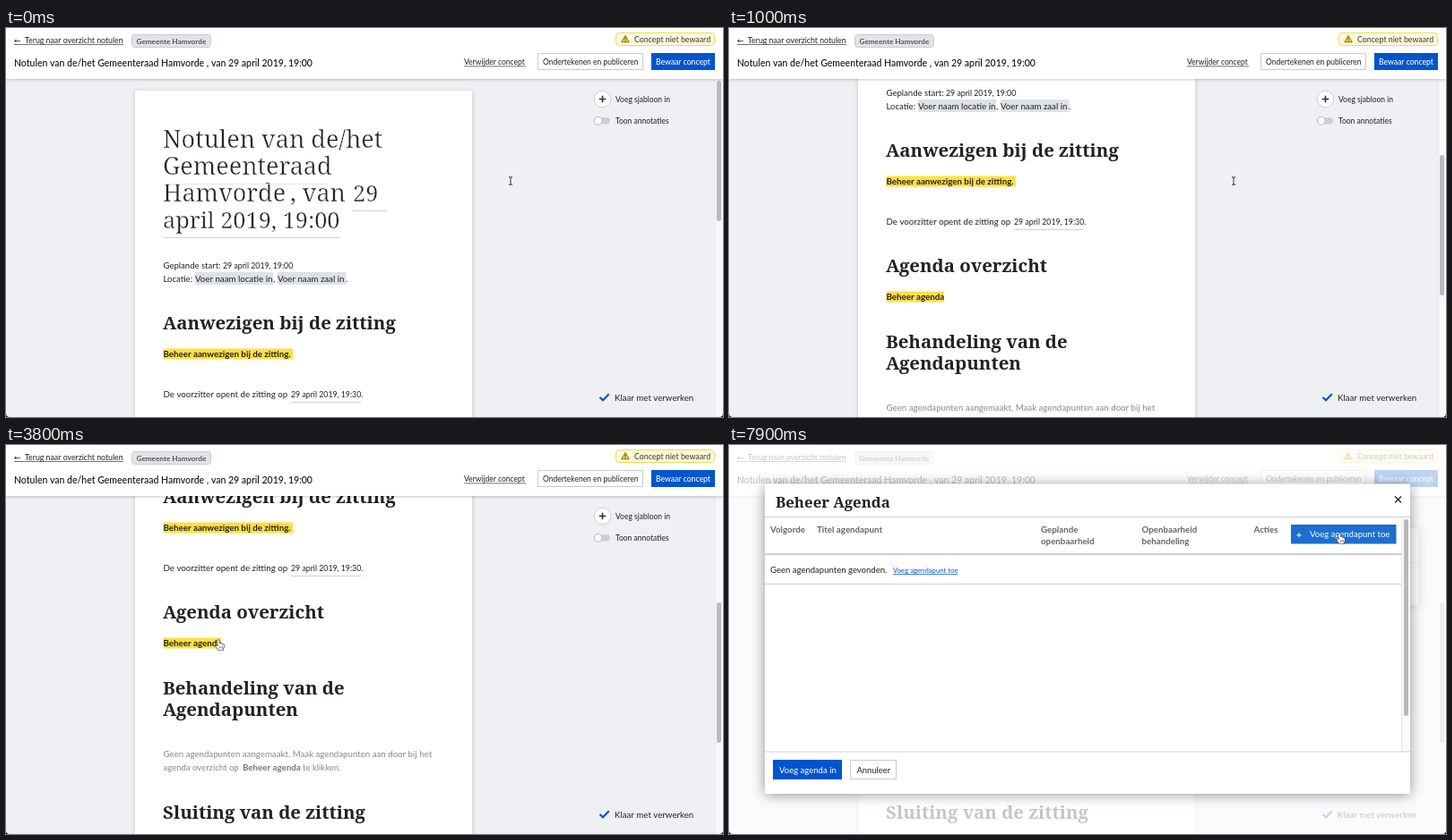
Write an HTML page with a canvas that moves like this. It is 800 by 435 pixels and loops after 8000 ms.

```html
<!DOCTYPE html>
<html lang="nl">
<head>
<meta charset="utf-8">
<title>Notulen</title>
<style>
html, body { margin: 0; width: 100%; height: 100%; overflow: hidden; background: #fff; }
canvas { display: block; width: 800px; height: 435px; }
</style>
</head>
<body>
<canvas id="stage"></canvas>
<script>
const W = 800, H = 435, LOOP = 8000;
const cv = document.getElementById('stage');
const c = cv.getContext('2d');
const dpr = window.devicePixelRatio || 1;
cv.width = W * dpr;
cv.height = H * dpr;

const SANS = 'Lato, "Open Sans", sans-serif';
const SERIF = '"Noto Serif", "DejaVu Serif", serif';
const BLUE = '#0055cc', INK = '#222', LINE = '#cbd0d8', YELLOW = '#ffe043';

// Text styles
const small = '400 8.5px ' + SANS;
const body = '400 9.7px ' + SANS;
const bold = '700 9.75px ' + SANS;
const date = '400 8.75px ' + SANS;
const label = '400 9.55px ' + SANS;
const note = '400 9.35px ' + SANS;
const column = '700 9.75px ' + SANS;
const h1 = '300 27px ' + SERIF;
const h1date = '300 25.3px ' + SERIF;
const h2 = '700 20.4px ' + SERIF;

// Event times in ms
const SCROLL_END = 1750, POPUP = 3900, MODAL = 6400, ROW_OFF = 7500, BTN_ON = 7600;

function text(s, x, y, font, color = INK) {
  c.font = font;
  c.fillStyle = color;
  c.fillText(s, x, y);
}

// A white outline trims the stems to a light weight
function thin(s, x, y, font) {
  text(s, x, y, font);
  c.strokeStyle = '#fff';
  c.lineWidth = .5;
  c.strokeText(s, x, y);
}

function box(x, y, w, h, fill, stroke, r = 0) {
  c.beginPath();
  c.roundRect(stroke ? x + .5 : x, stroke ? y + .5 : y, stroke ? w - 1 : w, stroke ? h - 1 : h, r);
  if (fill) { c.fillStyle = fill; c.fill(); }
  if (stroke) { c.strokeStyle = stroke; c.lineWidth = 1; c.stroke(); }
}

function shadowBox(x, y, w, h, blur, alpha, dy = 0) {
  c.save();
  c.shadowColor = `rgba(0,0,0,${alpha})`;
  c.shadowBlur = blur * dpr;
  c.shadowOffsetY = dy * dpr;
  box(x, y, w, h, '#fff');
  c.restore();
}

function path(points, color, width, close) {
  c.beginPath();
  points.forEach(([x, y]) => c.lineTo(x, y));
  if (close) c.closePath();
  c.strokeStyle = color;
  c.lineWidth = width;
  c.stroke();
}

function disc(x, y, r, fill, stroke) {
  c.beginPath();
  c.arc(x, y, r, 0, Math.PI * 2);
  c.fillStyle = fill;
  c.fill();
  c.strokeStyle = stroke;
  c.lineWidth = 1;
  c.stroke();
}

function plus(x, y, r, color, width) {
  path([[x - r, y], [x + r, y]], color, width);
  path([[x, y - r], [x, y + r]], color, width);
}

function page(scroll, active) {
  c.save();
  c.beginPath();
  c.rect(0, 57, W, H - 57);
  c.clip();
  c.translate(0, -scroll);
  shadowBox(144, 70, 376, 900, 5, .2, 1);

  thin('Notulen van de/het', 175, 133.5, h1);
  thin('Gemeenteraad', 175, 163.5, h1);
  thin('Hamvorde', 175, 193.5, h1);
  thin(', van', 317, 193.5, h1);
  thin('29', 387, 193.5, h1date);
  thin('april 2019, 19:00', 175, 223.5, h1date);
  box(175, 174, 184, 1, '#e2e5ea');
  box(387, 204, 38, 1, LINE);
  box(175, 234, 197, 1, LINE);

  text('Geplande start:', 175.5, 268.5, label);
  text('29 april 2019, 19:00', 242, 268.5, date);
  text('Locatie:', 175.5, 283.5, label);
  box(211, 273, 87, 14, '#dde1e8');
  box(303, 273, 76.5, 14, '#dde1e8');
  text('Voer naam locatie in', 211, 283.5, body);
  text(',', 298, 283.5, body);
  text('Voer naam zaal in', 303, 283.5, body);
  text('.', 379, 283.5, body);

  text('Aanwezigen bij de zitting', 175, 337.3, h2);
  box(175.5, 358.5, 144.5, 12, YELLOW);
  text('Beheer aanwezigen bij de zitting.', 175.5, 367.7, bold);

  text('De voorzitter opent de zitting op', 175.5, 412.5, body);
  text('29 april 2019, 19:30.', 318, 412.5, date);
  box(318, 418, 78, 1, LINE);

  text('Agenda overzicht', 175, 466.3, h2);
  box(175.5, 487.5, 64.5, 12, active ? '#dfe2e8' : YELLOW);
  text('Beheer agenda', 175.5, 497, bold);

  text('Behandeling van de', 175, 550.8, h2);
  text('Agendapunten', 175, 575.3, h2);
  text('Geen agendapunten aangemaakt. Maak agendapunten aan door bij het', 175.5, 620.7, body, '#888');
  text('agenda overzicht op', 175.5, 635.7, label, '#888');
  text('Beheer agenda', 264, 635.7, bold, '#777');
  text('te klikken.', 331, 635.7, label, '#888');

  text('Sluiting van de zitting', 175, 690.3, h2);
  c.restore();
}

function sidebar(scroll) {
  disc(665.5, 79.5, 9.3, '#fff', LINE);
  plus(665.5, 79.5, 3.8, '#333', 1.6);
  text('Voeg sjabloon in', 680, 82.7, small);
  box(656, 100, 18, 7.5, LINE, null, 3.7);
  disc(660.7, 103.7, 4.4, '#fff', '#b5bac3');
  text('Toon annotaties', 680, 107, small);
  path([[662.5, 413], [666, 416.3], [672.8, 409.3]], BLUE, 2.2);
  text('Klaar met verwerken', 679, 416.5, body);

  box(792, 57, 8, H - 57, '#f7f8f9');
  box(791.5, 57, .6, H - 57, '#e6e8eb');
  box(793, 59 + scroll * .43, 5, 157, '#b8babd', null, 2.5);
}

function header() {
  shadowBox(0, -10, W, 67, 3, .22, 1);
  text('←', 9, 17, '400 9px "DejaVu Sans", sans-serif');
  text('Terug naar overzicht notulen', 21, 17, '400 8.77px ' + SANS);
  box(9, 18.2, 122, .8, '#444');
  box(140, 7, 89, 15, '#e0e3e8', '#c8cdd5', 3);
  text('Gemeente Hamvorde', 145.5, 17.6, '700 8.2px ' + SANS, '#555');
  text('Notulen van de/het Gemeenteraad Hamvorde , van 29 april 2019, 19:00', 9, 43, '500 10.5px ' + SANS, '#111');

  box(680, 5, 111, 15, '#fef8dc', '#f0d95a', 4);
  c.lineJoin = 'round';
  c.beginPath();
  [[691, 8.4], [695.2, 15.8], [686.8, 15.8]].forEach(([x, y]) => c.lineTo(x, y));
  c.closePath();
  c.fillStyle = '#ffd72e';
  c.fill();
  c.strokeStyle = '#8a741c';
  c.lineWidth = 1;
  c.stroke();
  c.lineJoin = 'miter';
  box(690.5, 10.6, 1, 2.6, '#4d4210');
  box(690.5, 14, 1, 1, '#4d4210');
  text('Concept niet bewaard', 701, 16, '500 8.8px ' + SANS, '#4b4637');

  text('Verwijder concept', 511, 41, small);
  box(511, 42.4, 69, .8, '#444');
  box(593, 28, 118, 19, '#fff', '#c6cad1');
  text('Ondertekenen en publiceren', 599, 41, small);
  box(720, 28, 71, 19, BLUE);
  text('Bewaar concept', 725, 41, '500 8.6px ' + SANS, '#fff');
}

function popup() {
  c.save();
  c.shadowColor = 'rgba(0,0,0,.15)';
  c.shadowBlur = 3 * dpr;
  box(520, 201, 68, 47, '#f9fafb');
  c.restore();
  box(585, 201, 3, 47, LINE);
  ['Klik om de', 'juiste optie', 'selecteren'].forEach((s, i) =>
    text(s, 528.5, 214.5 + i * 13.7, note, '#555'));

  shadowBox(550, 92.5, 219, 86.5, 14, .4, 1);
  box(550, 131, 219, 1, LINE);
  const big = ' 11.1px ' + SANS;
  let x = 562;
  [['Wil u graag de ', 400], ['agenda', 700], [' beheren?', 400]].forEach(([s, w]) => {
    text(s, x, 114, w + big);
    x += c.measureText(s).width;
  });
  box(559, 141, 75, 22, BLUE);
  text('Beheer agenda', 565.5, 156, label, '#fff');
}

function modal(alpha, rowOn, btnOn) {
  c.save();
  c.globalAlpha = alpha;
  c.fillStyle = 'rgba(255,255,255,.74)';
  c.fillRect(0, 0, W, H);
  shadowBox(40, 43.5, 720, 346.5, 14, .42, 1);

  text('Beheer Agenda', 52, 70, '700 16.8px ' + SERIF);
  path([[743, 57.5], [750, 64.5]], INK, 1.3);
  path([[750, 57.5], [743, 64.5]], INK, 1.3);
  box(40, 80, 720, 1, LINE);

  const gray = '#666';
  text('Volgorde', 46, 98, column, gray);
  text('Titel agendapunt', 98, 98, column, gray);
  text('Geplande', 348, 98, column, gray);
  text('openbaarheid', 348, 110.5, column, gray);
  text('Openbaarheid', 460.5, 98, column, gray);
  text('behandeling', 460.5, 110.5, column, gray);
  text('Acties', 585.5, 98, column, gray);
  box(627, 89, 117.5, 21.5, btnOn ? '#1c6fd0' : BLUE);
  plus(636, 100.8, 2.6, '#fff', 1);
  text('Voeg agendapunt toe', 648, 103.3, label, '#fff');

  box(40, 121.3, 711, 1.7, '#c4c7cb');
  if (rowOn) box(40, 123, 711, 32, '#e8e8e8');
  box(40, 155, 711, 1, LINE);
  text('Geen agendapunten gevonden.', 46, 142.7, label);
  text('Voeg agendapunt toe', 183, 142.7, '400 7.75px ' + SANS, BLUE);
  box(183, 144, 72, .8, BLUE);

  box(751, 81, 9, 262, '#fafafa');
  box(750.3, 81, .8, 262, '#dcdee1');
  box(753, 83, 5, 220, '#b8b8b8', null, 2.5);

  box(40, 342.5, 720, 1, LINE);
  box(49, 352, 77, 22, BLUE);
  text('Voeg agenda in', 56, 367, label, '#fff');
  box(135, 352, 52, 22, '#fff', '#c6cad1');
  text('Annuleer', 142.5, 367, '400 9.4px ' + SANS);
  c.restore();
}

// Pointer stops: time, x, y
const stops = [
  [0, 563, 171], [2700, 563, 171], [3700, 237, 218], [5500, 237, 218],
  [6200, 600, 152], [6500, 600, 152], [6900, 630.5, 152.5],
  [7200, 630.5, 152.5], [7700, 681, 99], [8000, 681, 99]
];

function pointer(t) {
  let i = 0;
  while (i < stops.length - 2 && t >= stops[i + 1][0]) i++;
  const [t0, x0, y0] = stops[i], [t1, x1, y1] = stops[i + 1];
  const u = (t - t0) / (t1 - t0), e = u * u * (3 - 2 * u);
  return [x0 + (x1 - x0) * e, y0 + (y1 - y0) * e];
}

const within = (x, y, l, t, r, b) => x >= l && x <= r && y >= t && y <= b;

function cursorKind(t, x, y) {
  if (t >= MODAL) return within(x, y, 627, 89, 744, 111) ? 'hand' : 'arrow';
  if (within(x, y, 175, 215, 240, 229)) return 'hand';
  if (t >= POPUP && within(x, y, 550, 92, 769, 179))
    return within(x, y, 559, 141, 634, 163) ? 'hand' : 'arrow';
  return 'beam';
}

function cursor(kind, x, y) {
  c.save();
  c.translate(x, y);
  c.lineJoin = 'round';
  if (kind === 'beam') {
    for (const [color, w] of [['#fff', 2.4], ['#222', 1]]) {
      path([[0, -4], [0, 4]], color, w);
      path([[-2, -4.5], [0, -3.8], [2, -4.5]], color, w);
      path([[-2, 4.5], [0, 3.8], [2, 4.5]], color, w);
    }
  } else if (kind === 'arrow') {
    const pts = [[0, 0], [0, 9], [2, 7.2], [3.4, 10.4], [5, 9.7], [3.7, 6.6], [6.3, 6.4]];
    path(pts, '#fff', 1.4, true);
    c.fillStyle = '#111';
    c.fill();
  } else {
    const pts = [[-1, .5], [0, 0], [1, .8], [1.4, 4], [2.8, 3.8], [3.4, 4.5], [4.6, 4.4],
      [5.2, 5.2], [6, 5.5], [6, 8], [4.8, 11.5], [.2, 11.5], [-2.8, 7.4], [-2.6, 6.2],
      [-1.6, 6.3], [-.4, 7.4]];
    path(pts, '#222', 1.2, true);
    c.fillStyle = '#fff';
    c.fill();
    [1.4, 3, 4.5].forEach(d => path([[d, 7.2], [d, 9.6]], '#444', .6));
  }
  c.restore();
}

function corners() {
  c.fillStyle = '#111';
  for (const [x, d] of [[0, 1], [W, -1]]) {
    c.beginPath();
    c.moveTo(x, H - 4);
    c.quadraticCurveTo(x, H, x + 4 * d, H);
    c.lineTo(x, H);
    c.fill();
  }
}

function draw(t) {
  c.setTransform(dpr, 0, 0, dpr, 0, 0);
  c.fillStyle = '#eef0f3';
  c.fillRect(0, 0, W, H);

  const u = Math.min(t / SCROLL_END, 1);
  const scroll = Math.round(272 * (1 - Math.pow(1 - u, 1.46)));
  const open = t >= POPUP;
  page(scroll, open);
  sidebar(scroll);
  header();
  if (open) {
    if (t < MODAL) box(235.5, 216, .9, 11, '#222');
    popup();
  }
  if (t >= MODAL) modal(Math.min((t - MODAL + 100) / 200, 1), t < ROW_OFF, t >= BTN_ON);

  const [x, y] = pointer(t);
  cursor(cursorKind(t, x, y), x, y);
  corners();
}

const start = performance.now();
function tick() {
  const t = (performance.now() - start) % LOOP;
  draw(Math.floor(t / 100) * 100);
  requestAnimationFrame(tick);
}
tick();
</script>
</body>
</html>
```
